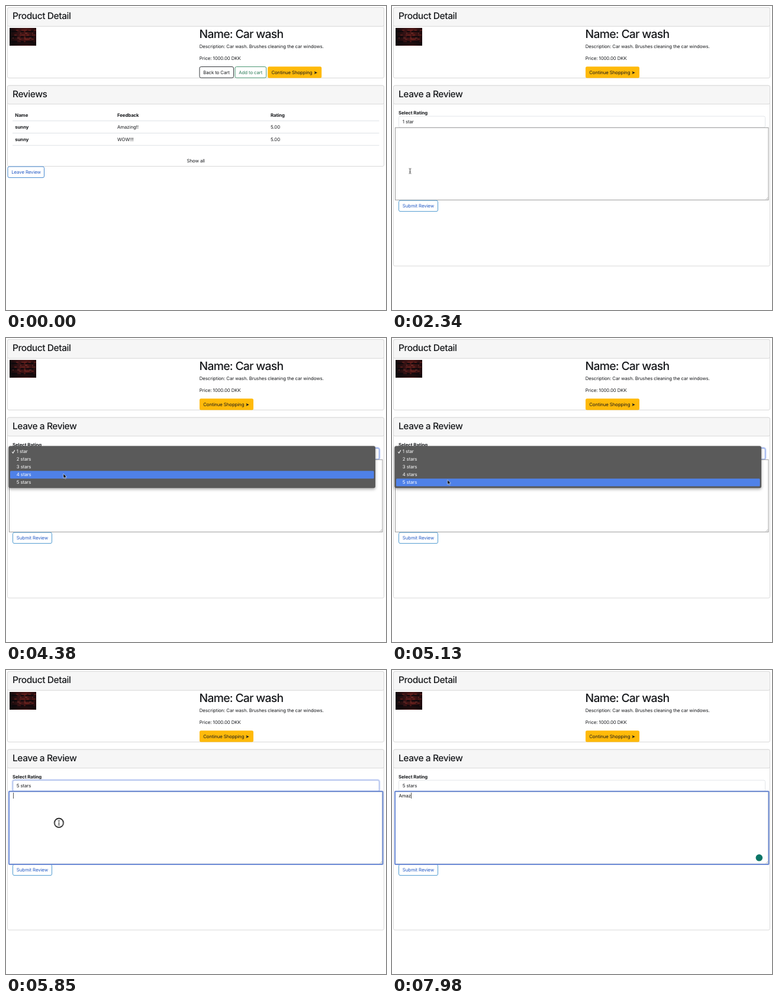
An HTML page that plays this animation: 642x513 px, repeating every 8000 ms.

```html
<!DOCTYPE html>
<html lang="en">
<head>
<meta charset="utf-8">
<title>Product review</title>
<style>
html, body { margin: 0; width: 100%; height: 100%; overflow: hidden; background: #fff; }
body { position: relative; }
svg { position: absolute; left: 0; top: 0; display: block; }
text, .typed {
  font: 400 7.8px Inter, "DejaVu Sans", sans-serif;
  font-optical-sizing: none;
  letter-spacing: -.01em;
  text-rendering: geometricPrecision;
  fill: #17191c;
}
text.h1 { font-size: 19.4px; font-weight: 500; letter-spacing: -.039em; }
text.h2 { font-size: 15.5px; font-weight: 500; letter-spacing: -.028em; }
.b { font-weight: 700; }
.mid { text-anchor: middle; }
text.green { fill: #2c7d58; }
text.blue { fill: #2259c4; }
text.white, .menu text { fill: #fff; }
.card { fill: #fff; stroke: #d9d9d9; }
.head { fill: #f6f6f6; stroke: #d9d9d9; }
.rule { stroke: #dee2e6; }
.btn { fill: #fff; stroke: #33373b; }

/* one shared 8 s clock; hard cuts by default */
.t { animation: 8s step-end infinite; }
.linear { animation-timing-function: linear; }
.page1 { animation-name: page1; }
.page2 { animation-name: page2; }
.hover { animation-name: hover; }
.one { animation-name: one; }
.five { animation-name: five; }
.ring { animation-name: ring; }
.focus { animation-name: focus; }
.menu { animation-name: menu; }
.pick { animation-name: pick; }
.badge { animation-name: badge; }
.cursor { animation-name: move; animation-timing-function: ease-in-out; }
.arrow { animation-name: arrow; }
.hand { animation-name: hover; }
.ibeam { animation-name: ibeam; }
.click { animation-name: click; }

@keyframes page1 { 0% { opacity: 1 } 22.9%, 100% { opacity: 0 } }
@keyframes page2 { 0% { opacity: 0 } 22.9%, 100% { opacity: 1 } }
@keyframes hover { 0%, 22.9%, 100% { opacity: 0 } 15.75% { opacity: 1 } }
@keyframes one { 0% { opacity: 1 } 67.5%, 100% { opacity: 0 } }
@keyframes five { 0% { opacity: 0 } 67.5%, 100% { opacity: 1 } }
@keyframes ring { 0%, 43.6% { opacity: 0 } 45.4%, 72.6% { opacity: 1 } 74.5%, 100% { opacity: 0 } }
@keyframes focus { 0% { opacity: 0 } 71%, 100% { opacity: 1 } }
@keyframes menu { 0%, 44.99% { opacity: 0 } 45%, 64.9% { opacity: 1 } 67.9%, 100% { opacity: 0 } }
@keyframes pick {
  0% { transform: translateY(0) }
  50.6% { transform: translateY(13px) }
  52% { transform: translateY(26px) }
  53.4% { transform: translateY(39px) }
  57.8%, 100% { transform: translateY(52px) }
}
@keyframes badge { 0% { opacity: 0 } 93%, 100% { opacity: 1 } }
@keyframes arrow { 0%, 15.75%, 69%, 100% { opacity: 0 } .375%, 42.4% { opacity: 1 } }
@keyframes ibeam { 0%, 42.4%, 87.75%, 100% { opacity: 0 } 22.9%, 69% { opacity: 1 } }
@keyframes click { 0%, 22%, 46%, 64%, 74.5%, 100% { opacity: 0 } 20%, 43.5%, 61.5%, 71% { opacity: 1 } }
@keyframes move {
  0%, .375% { transform: translate(568px, 400px) }
  9.75%, 10.5% { transform: translate(510px, 334px) }
  16.125% { transform: translate(27px, 280px) }
  16.875%, 20.625% { transform: translate(26.5px, 279px) }
  29.25%, 30.75% { transform: translate(30.5px, 278.5px) }
  36%, 37.875% { transform: translate(97px, 262px) }
  43.125%, 48.75% { transform: translate(98px, 196px) }
  54.75% { transform: translate(97px, 229px) }
  58.5% { transform: translate(95px, 239px) }
  66% { transform: translate(93.5px, 239.5px) }
  68.625%, 100% { transform: translate(89.4px, 258px) }
}

.typed {
  position: absolute; left: 11.5px; top: 207px; height: 10px; line-height: 10px;
  color: #111; border-right: 1px solid #555; white-space: pre;
  animation-name: caret;
}
.typed::before { content: ""; animation: type 8s step-end infinite; }
@keyframes caret { 0%, 77.6% { opacity: 0 } 71%, 82.9%, 100% { opacity: 1 } }
@keyframes type {
  0% { content: "" }
  87.75% { content: "A" }
  91.8% { content: "Am" }
  95% { content: "Ama" }
  98.4%, 100% { content: "Amaz" }
}
</style>
</head>
<body>
<svg width="642" height="513" viewBox="0 0 642 513">
  <defs>
    <linearGradient id="photo">
      <stop offset="0" stop-color="#12090b"/>
      <stop offset=".35" stop-color="#351214"/>
      <stop offset=".65" stop-color="#4a1615"/>
      <stop offset="1" stop-color="#1d0a0d"/>
    </linearGradient>
    <filter id="shade" x="-5%" y="-20%" width="110%" height="150%">
      <feDropShadow dx="0" dy="2" stdDeviation="2.5" flood-opacity=".35"/>
    </filter>
    <g id="shop">
      <rect y="102.3" width="91" height="19.2" rx="2.5" fill="#ffba0a"/>
      <text x="6.2" y="114.9">Continue Shopping ➤</text>
    </g>
  </defs>

  <!-- product -->
  <rect class="card" x="2.5" y="2.5" width="636" height="119" rx="2.5"/>
  <rect class="head" x="2.5" y="2.5" width="636" height="31.8" rx="2.5"/>
  <text class="h2" x="11" y="22.3">Product Detail</text>
  <rect x="6" y="37" width="45" height="30" fill="url(#photo)"/>
  <g fill="none">
    <path d="M6 43H51M6 52H51M6 60H51" stroke="#09080c" stroke-width="2.4" stroke-dasharray="13 6 5 3" opacity=".8"/>
    <path d="M17 41H51M14 49H50M22 56H51" stroke="#a3352c" stroke-dasharray="4 5 9 3" opacity=".7"/>
    <path d="M24 46H49M11 54H47" stroke="#c9675a" stroke-width=".8" stroke-dasharray="2 6 4 8" opacity=".6"/>
    <path d="M6 63.5H51" stroke="#0b090c" stroke-width="5" opacity=".65"/>
  </g>
  <text class="h1" x="326.6" y="53.7">Name: Car wash</text>
  <text x="326.8" y="71.3">Description: Car wash. Brushes cleaning the car windows.</text>
  <text x="326.8" y="91.2">Price: 1000.00 DKK</text>

  <!-- review list -->
  <g class="t page1">
    <rect class="btn" x="327" y="102.5" width="57.5" height="18.7" rx="2.5"/>
    <text x="333.2" y="114.9">Back to Cart</text>
    <rect class="btn" x="387" y="102.5" width="52.7" height="18.7" rx="2.5" style="stroke:#4b9673"/>
    <text class="green" x="393.2" y="114.9">Add to cart</text>
    <use href="#shop" x="442.2"/>

    <rect class="card" x="2.5" y="134.2" width="636" height="136.3" rx="2.5"/>
    <rect class="head" x="2.5" y="134.2" width="636" height="31.3" rx="2.5"/>
    <text class="h2" x="11" y="153.9">Reviews</text>
    <g class="b">
      <text class="b" x="15.3" y="186.8">Name</text>
      <text class="b" x="188" y="186.8">Feedback</text>
      <text class="b" x="447" y="186.8">Rating</text>
      <text class="b" x="15.3" y="207.1">sunny</text>
      <text class="b" x="15.3" y="227.6">sunny</text>
    </g>
    <text x="188" y="207.1">Amazing!!</text>
    <text x="447" y="207.1">5.00</text>
    <text x="188" y="227.6">WOW!!!</text>
    <text x="447" y="227.6">5.00</text>
    <path class="rule" d="M11 193.8H630.5M11 214.5H630.5M11 235.2H630.5"/>
    <text class="mid" x="320.7" y="263.6">Show all</text>

    <rect class="btn" x="3" y="271" width="61.5" height="18.6" rx="2.5" style="stroke:#4488cf"/>
    <text class="blue" x="9.2" y="283.3">Leave Review</text>
    <g class="t hover">
      <rect x="2.5" y="270.5" width="62.5" height="19.5" rx="2.7" fill="#0b63fc"/>
      <text class="white" x="9.2" y="283.3">Leave Review</text>
    </g>
  </g>

  <!-- review form -->
  <g class="t page2">
    <use href="#shop" x="327"/>
    <rect class="card" x="2.5" y="134.2" width="636" height="304.6" rx="2.5"/>
    <rect class="head" x="2.5" y="134.2" width="636" height="31.3" rx="2.5"/>
    <text class="h2" x="11" y="153.9">Leave a Review</text>
    <text class="b" x="11" y="182.9">Select Rating</text>

    <rect x="11.5" y="186" width="619" height="19" rx="2.5" fill="#fff" stroke="#e2e5e8"/>
    <g class="t ring linear" fill="none">
      <rect x="11" y="185.6" width="620" height="19.4" rx="3" stroke="#c6d3f8" stroke-width="3"/>
      <rect x="11.5" y="186" width="619" height="19" rx="2.5" stroke="#92abe6"/>
    </g>
    <text class="t one" x="17.8" y="198.2">1 star</text>
    <text class="t five" x="17.8" y="198.2">5 stars</text>

    <rect x="5.5" y="205.3" width="630.5" height="122" fill="#fff" stroke="#9a9a9a"/>
    <path d="M631.5 326.5l4-4M633.8 326.5l1.8-1.8" stroke="#999" stroke-width=".6"/>
    <rect class="btn" x="11.5" y="328.2" width="66" height="18.4" rx="2.5" style="stroke:#4f9ad0"/>
    <text class="blue" x="17.8" y="340.3">Submit Review</text>
    <rect class="t focus" x="5" y="204.8" width="631.6" height="123.2" rx="1" fill="none" stroke="#6c8bd6" stroke-width="2"/>
    <circle class="t badge" cx="620.3" cy="316.8" r="5.8" fill="#0b7566"/>
  </g>

  <!-- rating menu -->
  <g class="t menu linear">
    <rect x="4.3" y="182.3" width="619.7" height="71" rx="3" fill="#5a5a5a" filter="url(#shade)"/>
    <rect class="t pick" x="7" y="185.2" width="614.6" height="13" rx="1.5" fill="#4f81e8"/>
    <path d="M10.2 192l1.6 2.2 3-5" fill="none" stroke="#fff" stroke-width="1.1"/>
    <text x="17.8" y="194.2">1 star</text>
    <text x="17.8" y="207.2">2 stars</text>
    <text x="17.8" y="220.2">3 stars</text>
    <text x="17.8" y="233.2">4 stars</text>
    <text x="17.8" y="246.2">5 stars</text>
  </g>

  <!-- pointer -->
  <g class="t cursor">
    <circle class="t click" r="7.6" fill="none" stroke="#111" stroke-width="1.6"/>
    <path class="t arrow" d="M0 0V7.6L1.8 6 3 8.7 4.3 8.1 3.1 5.5H5.5Z" fill="#000" stroke="#fff" stroke-width=".6"/>
    <path class="t hand" d="M-.5 .3Q.4-.5 1 .5V3L4.6 3.6Q5.6 4 5.4 5.2L4.6 8H.6L-2 4.9Q-1.8 3.9-.7 4.5Z" fill="#fff" stroke="#111" stroke-width=".7"/>
    <path class="t ibeam" d="M-1.9-4.2Q-.2-4.2 0-3.4 .2-4.2 1.9-4.2M0-3.4V3.4M-1.9 4.2Q-.2 4.2 0 3.4 .2 4.2 1.9 4.2M-1 1H1" fill="none" stroke="#222" stroke-width=".9"/>
  </g>
</svg>
<div class="t typed"></div>
</body>
</html>
```
